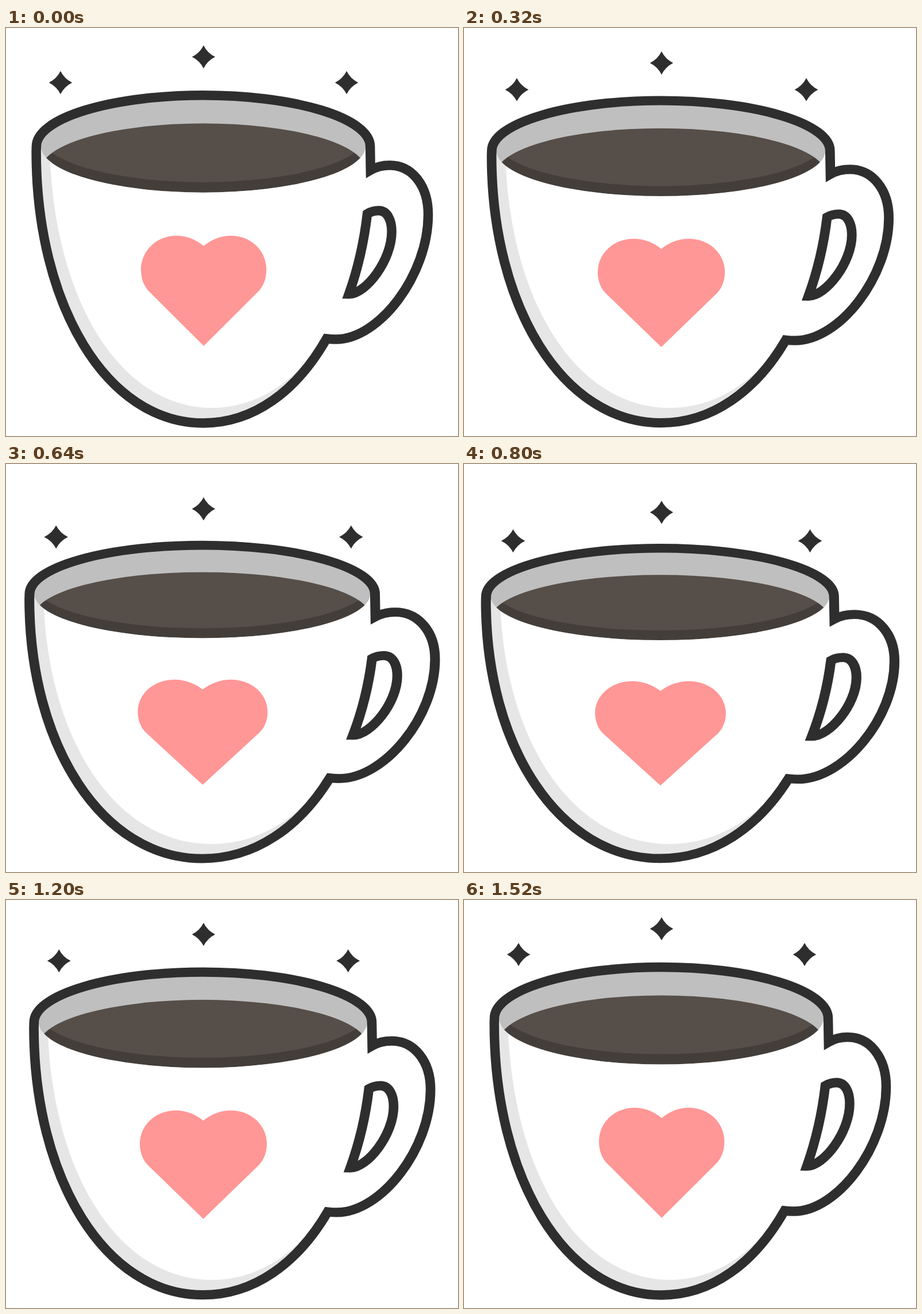
These frames come from a looping animation (787x711 px, 1.56 s). An HTML page:

```html
<!DOCTYPE html>
<html>
<head>
<meta charset="utf-8">
<style>
  html, body { margin: 0; width: 100%; height: 100%; overflow: hidden; background: #fff; }
  svg { display: block; }
</style>
</head>
<body>
<svg width="787" height="711" viewBox="0 0 787 711">
  <defs>
    <ellipse id="opening" cx="343.5" cy="206" rx="282.5" ry="80.5"/>
    <path id="shade" d="M52.7 206V215C52.7 482 175 688.5 343.5 688.5C431 688.5 506 633 558 541.5V206Z"/>
    <path id="sparkle" fill="#2e2e2e" d="M0-20.2Q6.7-6.7 20.2 0Q6.7 6.7 0 20.2Q-6.7 6.7-20.2 0Q-6.7-6.7 0-20.2Z"/>
    <clipPath id="inShade"><use href="#shade"/></clipPath>
    <clipPath id="inOpening"><use href="#opening"/></clipPath>
    <clipPath id="inCoffee" clip-path="url(#inOpening)"><use href="#opening" y="40.6"/></clipPath>
  </defs>

  <g id="cup">
    <g clip-path="url(#inShade)">
      <use href="#shade" fill="#e6e6e6"/>
      <path fill="#fff" d="M76 188H641C641 463 522.5 662 358.5 662S76 463 76 188Z"/>
    </g>
    <path fill="#fff" d="M500 206H600L560 541L545 556Z"/>
    <path fill="#bfbfbf" d="M53 206A290.5 89 0 0 1 634 206H626A282.5 80.5 0 0 1 61 206Z"/>
    <g clip-path="url(#inCoffee)">
      <use href="#opening" fill="#443e3a"/>
      <use href="#opening" y="-18" fill="#564e48"/>
    </g>
    <path fill="#ff9796" d="M344.2 380C331 369 315 362 297 362C262 362 235 388 235 421C235 436 240 450 249 459L344.2 554L439.4 459C448.4 450 453.4 436 453.4 421C453.4 388 426.4 362 391.4 362C373.4 362 357.4 369 344.2 380Z"/>
    <g fill="none" stroke="#2e2e2e" stroke-width="16.5" stroke-miterlimit="10">
      <path d="M53 206A290.5 89 0 0 1 634 206L634.7 247.5C645 241.5 655 239 668 239C708 239 735 276 735 325C735 430 650 542.5 574 542.5Q566 542.5 558 541.5C506 633 431 688.5 343.5 688.5C175 688.5 52.7 482 52.7 215Z"/>
      <path d="M629 323.7C635 320 641 318.2 649 318.2C664 318.2 671.5 335 671.5 355C671.5 405 626 464 597 463.5Q620.5 397 629 323.7Z"/>
    </g>
  </g>
  <use class="sparkle" href="#sparkle"/>
  <use class="sparkle" href="#sparkle"/>
  <use class="sparkle" href="#sparkle"/>
</svg>
<script>
  const LOOP = 1560;
  const cup = document.getElementById('cup');
  const sparkles = document.querySelectorAll('.sparkle');

  // Position in a 2 s squash cycle; it rushes past the lowest point.
  function cycleTime(t) {
    if (t < 800) return t + 50;
    if (t < 1040) return 850 + (t - 800) * 640 / 240;
    return t + 450;
  }

  function draw(now) {
    const t = now % LOOP;
    const squash = (1 - Math.cos(Math.PI * cycleTime(t) / 1000)) / 2;

    cup.setAttribute('transform',
      `translate(394 668) scale(${1 + 0.045 * squash} ${1 - 0.057 * squash}) translate(-394 -668)`);

    sparkles.forEach((sparkle, i) => {
      const side = i - 1;
      const x = 344 + side * (249 + 10 * squash);
      const y = side ? 94.9 + 41.3 * squash : 50.1 + 36 * squash;
      const stretch = side ? 1 + 0.03 * squash : 1;
      sparkle.setAttribute('transform', `translate(${x} ${y}) scale(${stretch} 1)`);
    });
    requestAnimationFrame(draw);
  }
  draw(0);
</script>
</body>
</html>
```
